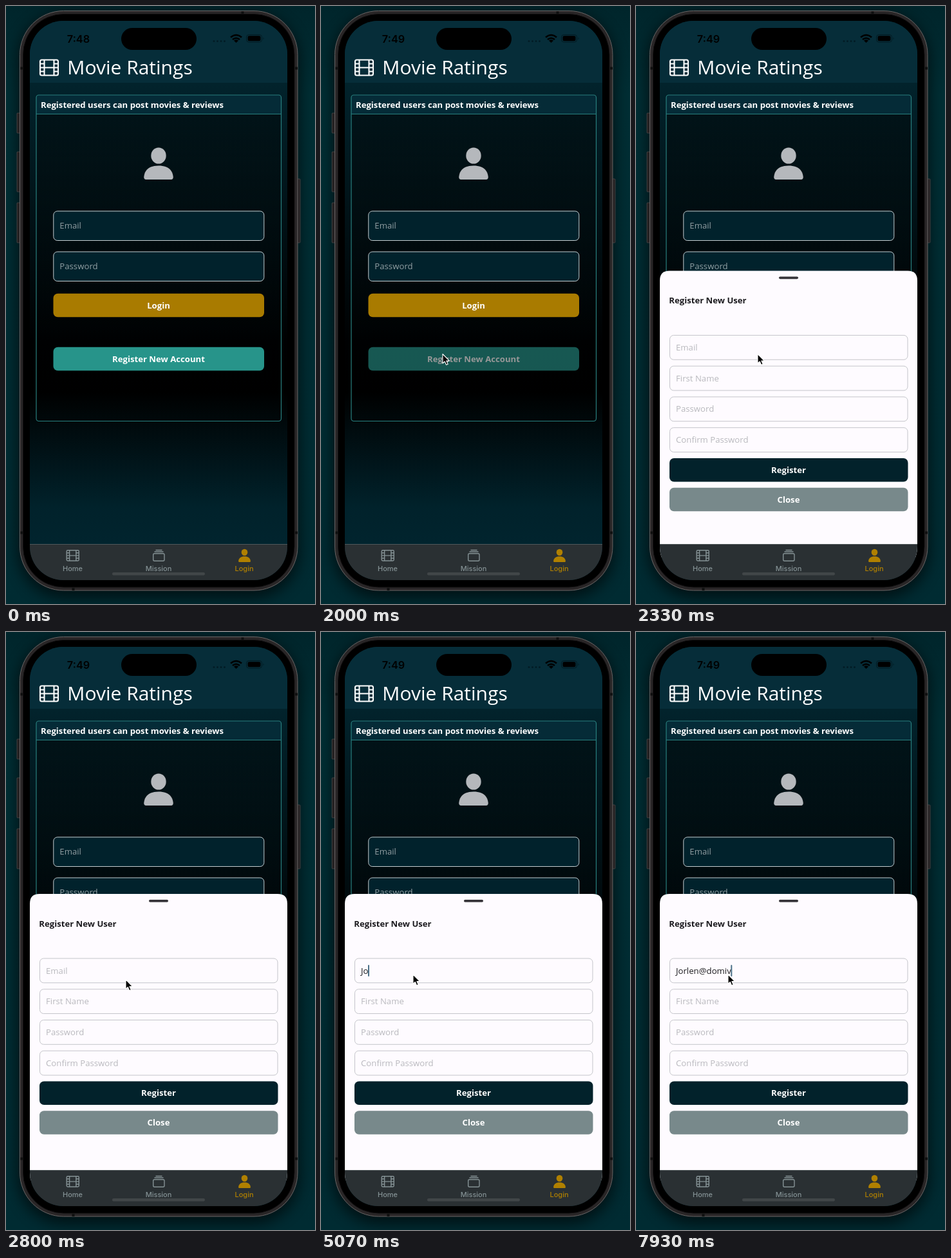
Write an HTML page that moves like this. It is 480 px wide and 927 px high and loops after 8 s.

```html
<!DOCTYPE html>
<html lang="en">
<head>
<meta charset="utf-8">
<title>Movie Ratings</title>
<style>
  html, body { margin: 0; width: 100%; height: 100%; overflow: hidden; background: #002a31; }
  svg { display: block; width: 480px; height: 927px; }
  text { font: 13.2px "Open Sans", sans-serif; }
  .bold { font-weight: 700; font-size: 13.15px; }
  .mid { text-anchor: middle; }
  .white { fill: #fff; }
  .field { fill: #01222c; stroke: #c5cdd0; }
  .hint { fill: #929fa3; }
  .sheet-field { fill: #fefbff; stroke: #c4c5ca; }
  .sheet-hint { fill: #b9b9be; }
  .tab { font: 500 11px Inter, sans-serif; }
  .clock { font: 600 16.3px Inter, sans-serif; }
</style>
</head>
<body>
<svg viewBox="0 0 480 927">
  <defs>
    <linearGradient id="screenFill" gradientUnits="userSpaceOnUse" x1="0" y1="119" x2="0" y2="834">
      <stop offset="0" stop-color="#02232c"/>
      <stop offset=".56" stop-color="#000102"/>
      <stop offset=".67" stop-color="#000"/>
      <stop offset=".92" stop-color="#01222b"/>
      <stop offset="1" stop-color="#01242e"/>
    </linearGradient>
    <linearGradient id="cardShade" x1="0" y1="0" x2="0" y2="1">
      <stop offset="0" stop-color="#000" stop-opacity=".42"/>
      <stop offset="1" stop-color="#000" stop-opacity="0"/>
    </linearGradient>
    <linearGradient id="wall" x1="0" y1="0" x2="0" y2="1">
      <stop offset="0" stop-color="#00252b"/>
      <stop offset=".15" stop-color="#002e34"/>
      <stop offset="1" stop-color="#002b32"/>
    </linearGradient>
    <filter id="blur" x="-20%" y="-10%" width="140%" height="120%"><feGaussianBlur stdDeviation="11"/></filter>
    <clipPath id="screenClip"><rect x="37" y="23" width="400" height="867" rx="52"/></clipPath>
    <symbol id="person" viewBox="0 0 46 50" overflow="visible">
      <ellipse cx="23" cy="13" rx="11.7" ry="12.6"/>
      <path d="M3.5 50Q0 50 .3 45.500C1.500 34 10 28.500 23 28.500S44.500 34 45.700 45.500Q46 50 42.500 50Z"/>
    </symbol>
    <symbol id="film" viewBox="0 0 30 26" overflow="visible">
      <g fill="none" stroke="currentColor" stroke-width="2.1">
        <rect x="1" y="1" width="28" height="24" rx="2.5"/>
        <path d="M7.500 1V25M22.500 1V25M7.500 13H22.500M1 7H7.500M1 13H7.500M1 19H7.500M22.500 7H29M22.500 13H29M22.500 19H29"/>
      </g>
    </symbol>
  </defs>

  <rect width="480" height="927" fill="url(#wall)"/>
  <rect x="18" y="12" width="438" height="905" rx="72" opacity=".6" filter="url(#blur)"/>

  <!-- phone body -->
  <g fill="#242122" stroke="#4d4848" stroke-width=".8">
    <rect x="17" y="166" width="6" height="31" rx="1"/>
    <rect x="17" y="226" width="6" height="62" rx="1"/>
    <rect x="17" y="305" width="6" height="62" rx="1"/>
    <rect x="451" y="268" width="6" height="99" rx="1"/>
  </g>
  <rect x="21.5" y="7.500" width="431.500" height="898.500" rx="68" fill="#292627" stroke="#6a6565"/>
  <path d="M367.500 8v4M104.500 902v4M22 96.500h4M449 96.500h4M22 816.500h4M449 816.500h4" stroke="#111" stroke-width="4"/>
  <rect x="26.500" y="12.500" width="421.500" height="888.500" rx="63" stroke="#121011"/>

  <g clip-path="url(#screenClip)">
    <rect x="37" y="23" width="400" height="867" fill="url(#screenFill)"/>
    <rect x="37" y="23" width="400" height="96" fill="#062d39"/>

    <!-- status bar -->
    <text id="clock" class="clock mid" x="112.500" y="56.500"></text>
    <rect x="179" y="34" width="117" height="34" rx="17"/>
    <path d="M323 54.500h19" stroke="#021c25" stroke-width="3" stroke-linecap="round" stroke-dasharray="0 5.500"/>
    <g fill="none" stroke="#000" stroke-width="2.600">
      <path d="M349 48.500Q357.500 41.500 366 48.500M352 52Q357.500 47.500 363 52"/>
    </g>
    <path d="M354 53.700Q357.500 50.900 361 53.700L357.500 57Z"/>
    <rect x="373.500" y="44.500" width="24" height="11.500" rx="3.800" fill="none" stroke="#021a22"/>
    <rect x="375.500" y="46.300" width="20" height="8" rx="2.300"/>
    <path d="M399.500 48.300q2 2 0 4z" fill="#021a22"/>

    <use href="#film" x="52" y="82.500" width="30" height="26" color="#fff"/>
    <text class="white" x="95.300" y="106" style="font-size:30px">Movie Ratings</text>

    <!-- login card -->
    <rect x="47" y="138" width="380.500" height="505.500" rx="4" fill="url(#cardShade)"/>
    <path d="M47 167.500V142q0-4 4-4H423.500q4 0 4 4V167.500Z" fill="#052b37"/>
    <path d="M47 167.500H427.500" stroke="#287f7e"/>
    <rect x="47" y="138" width="380.500" height="505.500" rx="4" fill="none" stroke="#287f7e" stroke-width="1.200"/>
    <text class="bold white" x="54" y="157.700">Registered users can post movies &amp; reviews</text>
    <use href="#person" x="214" y="219" width="46" height="50" fill="#b5b8bc"/>
    <g id="loginForm"></g>

    <g id="sheet">
      <path d="M37 850V421q0-15 15-15H422q15 0 15 15V850Z" fill="#fefbff"/>
      <rect x="222" y="415" width="30" height="3.700" rx="1.800" fill="#37353a"/>
      <text class="bold" x="51.300" y="456.800" fill="#1c1b1f">Register New User</text>
      <g id="sheetForm"></g>
      <text id="typed" x="62" y="529.500" fill="#1c1b1f"></text>
      <rect id="caret" y="516" width="2" height="18" rx="1" fill="#4b7188"/>
    </g>

    <!-- tab bar -->
    <rect x="37" y="834" width="400" height="56" fill="#2a3033"/>
    <path d="M37 834.500H437" stroke="#50585a"/>
    <rect x="165" y="878" width="144" height="4.500" rx="2.200" fill="#414648"/>
    <g color="#849194" fill="#849194">
      <use href="#film" x="93.500" y="843" width="20.500" height="17.700"/>
      <g fill="none" stroke="currentColor" stroke-width="1.400">
        <rect x="228.700" y="848.700" width="17.300" height="11.600" rx="2"/>
        <path d="M230.500 846H244.500M232.500 843.500H242.500"/>
      </g>
      <text class="tab mid" x="103.500" y="876">Home</text>
      <text class="tab mid" x="237" y="876">Mission</text>
    </g>
    <g fill="#b08000">
      <use href="#person" x="361" y="841.500" width="19" height="20.600"/>
      <text class="tab mid" x="370" y="876">Login</text>
    </g>
  </g>

  <path id="cursor" d="M0 0V14.500L3.300 11.500L5.600 16.800L8.200 15.700L5.900 10.600H10.500Z" stroke="#fff" stroke-width="1.100" stroke-linejoin="round"/>
</svg>
<script>
const LOOP = 8000;
const $ = id => document.getElementById(id);
const clamp = v => Math.max(0, Math.min(1, v));
const smooth = v => { v = clamp(v); return v * v * (3 - 2 * v); };

const field = (x, y, w, h, label, kind) =>
  `<rect class="${kind}field" x="${x}" y="${y}" width="${w}" height="${h}" rx="6"/>
   <text class="${kind}hint" x="${x + 9.5}" y="${y + h / 2 + 4.6}">${label}</text>`;
const button = (x, y, w, label, color) =>
  `<g><rect x="${x}" y="${y}" width="${w}" height="36.5" rx="7" fill="${color}"/>
   <text class="bold mid white" x="237" y="${y + 22.8}">${label}</text></g>`;

$('loginForm').innerHTML =
  field(73.8, 318, 327, 45.5, 'Email', '') +
  field(73.8, 381, 327, 45.5, 'Password', '') +
  button(73.5, 445.8, 327.5, 'Login', '#a97b00') +
  button(73.5, 528.8, 327.5, 'Register New Account', '#27948a');
$('sheetForm').innerHTML =
  ['Email', 'First Name', 'Password', 'Confirm Password']
    .map((label, i) => field(52.5, 506 + i * 47.75, 369.5, 37.8, label, 'sheet-')).join('') +
  button(52, 696.5, 370.5, 'Register', '#02222b') +
  button(52, 742.3, 370.5, 'Close', '#78898b');

const registerButton = $('loginForm').lastElementChild;
const emailHint = $('sheetForm').querySelector('text');
const address = 'Jorlen@domiv';
const keyTimes = [4650, 4870, 5080, 5290, 5490, 5700, 6130, 6680, 6950, 7220, 7500, 7800];
const focusTime = 3560;

// Cursor stops: time, x, y
const path = [[600, -14, 400], [1000, 181.5, 431.5], [1550, 189, 539.5],
              [2700, 189, 539.5], [3350, 143, 531], [LOOP, 143, 531]];

function cursorAt(t) {
  const i = Math.max(1, path.findIndex(p => t <= p[0]));
  const [a, b] = [path[i - 1], path[i]];
  const k = smooth((t - a[0]) / (b[0] - a[0]));
  return [a[1] + (b[1] - a[1]) * k, a[2] + (b[2] - a[2]) * k];
}

function draw(t) {
  $('clock').textContent = t < 1400 ? '7:48' : '7:49';
  $('cursor').setAttribute('transform', `translate(${cursorAt(t)})`);

  const press = smooth((t - 1925) / 150) - smooth((t - 2080) / 250);
  registerButton.setAttribute('opacity', 1 - 0.8 * press);

  const slide = clamp((t - 2166) / 250);
  const offset = slide < 1 ? 430 * 2 ** (-10 * slide) : 0;
  $('sheet').setAttribute('transform', `translate(0 ${offset})`);
  $('sheet').setAttribute('visibility', slide > 0 ? 'visible' : 'hidden');

  const count = keyTimes.filter(k => k <= t).length;
  $('typed').textContent = address.slice(0, count);
  emailHint.setAttribute('opacity', count ? 0 : 1);

  const since = t - (count ? keyTimes[count - 1] : focusTime);
  const x = 62 + (count ? $('typed').getComputedTextLength() - 0.5 : 0);
  $('caret').setAttribute('x', x);
  $('caret').setAttribute('opacity', since >= 0 && since % 1000 < 550 ? 1 : 0);
}

function tick() {
  draw(performance.now() % LOOP);
  requestAnimationFrame(tick);
}
tick();
</script>
</body>
</html>
```
